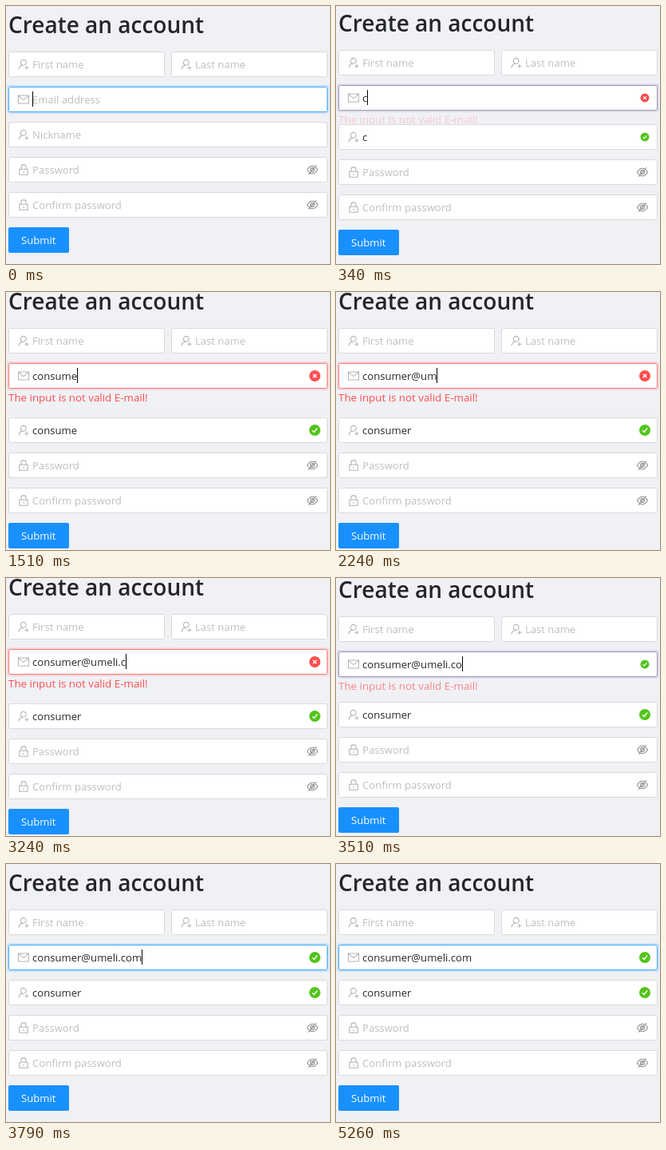
An HTML page for the animation above (5660 ms loop, 406 by 323 pixels).

```html
<!DOCTYPE html>
<html lang="en">
<head>
<meta charset="utf-8">
<title>Create an account</title>
<style>
  html, body { margin: 0; height: 100%; overflow: hidden; background: #f0f1f5; }
  svg { display: block; font: 13.1px "Open Sans", "Noto Sans", sans-serif; }
  .title { font-size: 28px; font-weight: 600; fill: #23252a; }
  .box { fill: #fff; stroke: #d9d9d9; }
  .hint { fill: #bfbfbf; }
  .value { fill: #262626; }
  .icon { fill: none; stroke: #b4b4b4; stroke-width: 1.1; }
  .eye { stroke: #8c8c8c; }
  .mark { fill: none; stroke: #fff; stroke-width: 1.4; }
  .error { font-size: 13.35px; fill: #ff4d4f; }
</style>
</head>
<body>
<svg id="stage" width="406" height="323" viewBox="0 0 406 323"></svg>
<script>
const LOOP = 5660, STEP = 70;
const INVALID_AT = 270, VALID_AT = 3440, FADE = 300, SLIDE = 320, ERROR_HEIGHT = 24;
const ADDRESS = 'consumer@umeli.com';
const KEY_TIMES = [270, 540, 750, 1020, 1150, 1380, 1510, 1710, 1840,
  2040, 2240, 2440, 2640, 2840, 3040, 3240, 3440, 3580];
const BLUE = [64, 169, 255], RED = [255, 120, 117];
const CHECK = 'M-3.1 .2L-.9 2.4L3.1-2.5', CROSS = 'M-2.3-2.3L2.3 2.3M2.3-2.3L-2.3 2.3';

// Icons are centred on the origin.
const ICONS = {
  user: 'M-3.6-2.2a3.4 3.4 0 1 1 6.8 0a3.4 3.4 0 1 1-6.8 0M-6 6.2C-5.7 3-3.4 1.2-.2 1.2M1.4 4.2h5M3.9 1.7v5',
  mail: 'M-6.5-5h13v10h-13zM-6-4.4L0 .6L6-4.4',
  lock: 'M-5.2-.7h10.4v7h-10.4zM-3-.7v-3.2q0-2.2 2-2.2h2q2 0 2 2.2v3.2M0 2v2',
  eye: 'M-6.5 0Q-3.8-4.8 0-4.8T6.5 0Q3.8 4.8 0 4.8T-6.5 0M-2.4 0a2.4 2.4 0 1 1 4.8 0a2.4 2.4 0 1 1-4.8 0M4.9-5.7L-4.9 5.7'
};

const icon = (name, x, extra = '') =>
  `<path class="icon ${extra}" d="${ICONS[name]}" transform="translate(${x} 16)"/>`;

const badge = id => `<g id="${id}Badge"><circle r="7" fill="#52c41a"/><path class="mark" d="${CHECK}"/></g>`;

const field = (iconName, hint, { id = '', x = 3, width = 400, hidden = false } = {}) => `
  <rect class="box" ${id && `id="${id}Box"`} x="${x + .5}" y=".5" width="${width - 1}" height="31" rx="2"/>
  ${icon(iconName, x + 19)}
  <text class="hint" ${id && `id="${id}Hint"`} x="${x + 30}" y="21">${hint}</text>
  ${id && `<text class="value" id="${id}Value" x="33" y="21"></text>${badge(id)}`}
  ${hidden ? icon('eye', 384, 'eye') : ''}`;

const row = (y, content) => `<g transform="translate(0 ${y})">${content}</g>`;

const stage = document.getElementById('stage');
stage.innerHTML = `<g id="form">
  <text class="title" x="3" y="34">Create an account</text>
  ${row(57, field('user', 'First name', { width: 196 }) + field('user', 'Last name', { x: 207, width: 196 }))}
  ${row(101, `<rect id="glow" x="2" y="-1" width="402" height="34" rx="3" fill="none" stroke-width="2" stroke-opacity=".22"/>
    ${field('mail', 'Email address', { id: 'email' })}
    <rect id="caret" y="6" width="1" height="19"/>
    <text class="error" id="error" x="3" y="48">The input is not valid E-mail!</text>`)}
  <g id="lower">
    ${row(145, field('user', 'Nickname', { id: 'login' }))}
    ${row(189, field('lock', 'Password', { hidden: true }))}
    ${row(233, field('lock', 'Confirm password', { hidden: true }))}
    ${row(277, `<rect x="3" width="76" height="32" rx="2" fill="#1890ff"/>
      <text x="19" y="21" fill="#fff">Submit</text>`)}
  </g>
</g>`;

const $ = id => document.getElementById(id);
const clamp = v => Math.max(0, Math.min(1, v));
const mix = (a, b, p) => `rgb(${a.map((v, i) => Math.round(v + (b[i] - v) * p))})`;
const overshoot = p => 1 + 2.7 * (p - 1) ** 3 + 1.7 * (p - 1) ** 2;

function setText(id, text) {
  $(id + 'Value').textContent = text;
  $(id + 'Hint').style.display = text ? 'none' : '';
}

function setBadge(id, elapsed, valid) {
  const node = $(id + 'Badge'), scale = elapsed < 0 ? 0 : overshoot(clamp(elapsed / FADE));
  node.setAttribute('transform', `translate(387 16) scale(${scale})`);
  node.firstChild.setAttribute('fill', valid ? '#52c41a' : '#ff4d4f');
  node.lastChild.setAttribute('d', valid ? CHECK : CROSS);
}

function draw(t) {
  const typed = ADDRESS.slice(0, KEY_TIMES.filter(time => time <= t).length);
  setText('email', typed);
  setText('login', typed.split('@')[0]);

  // Transitions advance in coarse steps.
  const since = start => Math.floor((t - start) / STEP) * STEP;
  const valid = t >= VALID_AT;
  const elapsed = since(valid ? VALID_AT : INVALID_AT);
  const fade = clamp(elapsed / FADE), slide = clamp(elapsed / SLIDE);

  const extra = Math.round(ERROR_HEIGHT * (valid ? 1 - slide : slide));
  $('form').setAttribute('transform', `translate(0 ${-Math.floor(extra / 2)})`);
  $('lower').setAttribute('transform', `translate(0 ${extra})`);
  $('error').setAttribute('opacity', valid ? clamp(1 - fade * 1.45) : fade);

  const tint = clamp(fade * 2.1);
  const color = mix(BLUE, RED, valid ? 1 - tint : tint);
  $('emailBox').style.stroke = color;
  $('glow').setAttribute('stroke', color);

  setBadge('email', elapsed, valid);
  setBadge('login', since(INVALID_AT), true);

  const width = typed ? $('emailValue').getComputedTextLength() : 0;
  $('caret').setAttribute('x', 33 + Math.round(width));
  $('caret').style.display = t < 4190 || (t >= 4730 && t < 5260) ? '' : 'none';
}

const begin = performance.now();
function tick() {
  draw((performance.now() - begin) % LOOP);
  requestAnimationFrame(tick);
}
tick();
</script>
</body>
</html>
```
